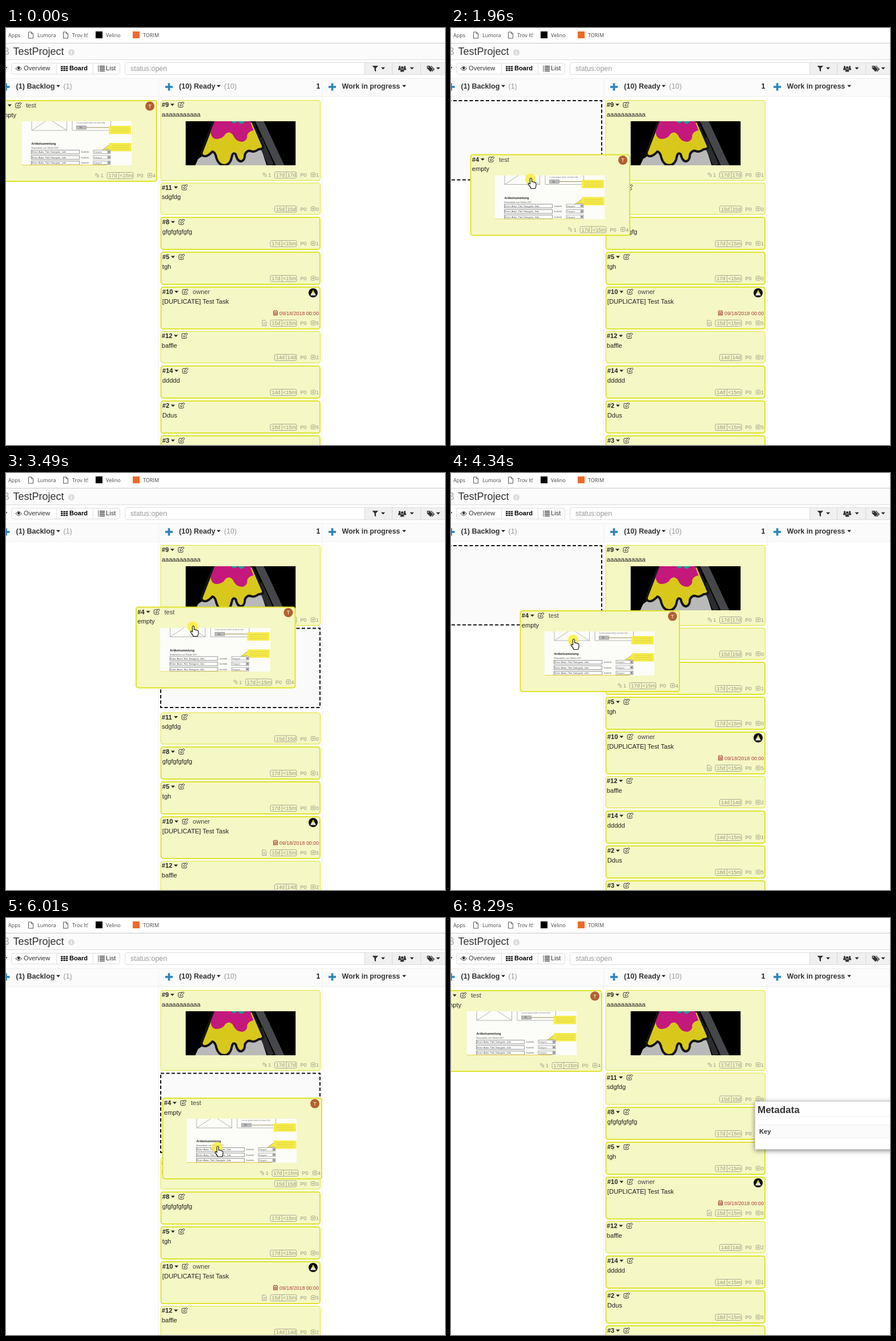
An HTML page for the animation above (8.63 s loop, 769x729 px).

```html
<!DOCTYPE html>
<html lang="en">
<head>
<meta charset="utf-8">
<title>Board drag and drop</title>
<style>
html, body { margin: 0; width: 100%; height: 100%; overflow: hidden; background: #fff; }
svg { display: block; width: 100%; height: 100%; font-family: "Liberation Sans", Arial, sans-serif; }
text { white-space: pre; }
</style>
</head>
<body>
<svg id="stage" viewBox="0 0 769 729" xmlns="http://www.w3.org/2000/svg"></svg>
<script>
const LOOP = 8630;
const CARD_W = 281, READY_X = 270, HOME = [-16, 126], SLOT_SHIFT = 148;
const DRAG_START = 1080, DROP = 7000, POPUP = 7770;

// Drawing helpers
const text = (x, y, s, size = 11.1, fill = '#222', extra = '') =>
  `<text x="${x}" y="${y}" font-size="${size}" fill="${fill}" ${extra}>${s}</text>`;
const bold = (x, y, s, size = 11.1, fill = '#222') => text(x, y, s, size, fill, 'font-weight="bold"');
const rect = (x, y, w, h, fill, extra = '') =>
  `<rect x="${x}" y="${y}" width="${w}" height="${h}" fill="${fill}" ${extra}/>`;
const path = (d, fill = 'none', stroke = 'none', width = 1) =>
  `<path d="${d}" fill="${fill}" stroke="${stroke}" stroke-width="${width}" stroke-linejoin="round"/>`;
const circle = (x, y, r, fill, extra = '') => `<circle cx="${x}" cy="${y}" r="${r}" fill="${fill}" ${extra}/>`;
const group = (x, y, body, extra = '') => `<g transform="translate(${x} ${y})" ${extra}>${body}</g>`;
const caret = (x, y, fill = '#222') => path(`M${x - 3.5} ${y - 1.8}h7l-3.5 3.8z`, fill);
const plus = x => path(`M${x - 6.5} 103h13M${x} 96.5v13`, 'none', '#2a84bd', 3.6);

const editIcon = (x, y) => group(x, y,
  path('M2.5 -4H-3.5Q-4.8 -4 -4.8 -2.7V3Q-4.8 4.3 -3.5 4.3H2Q3.3 4.3 3.3 3V1', 'none', '#333') +
  path('M-1.8 1.8L-1.4 -.6L3.4 -5.2L5.3 -3.4L.6 1.4Z', '#f5f7c4', '#333'));

const clipIcon = (x, y) => path(`M${x + 2} ${y - 1.5}l3.5 3.5q1 1.4 0 2q-.8 .5 -1.8 -.5l-3 -3.200q-1.200 -1.500 -.2 -2.600q1.100 -1 2.600 .3l3.600 3.600`, 'none', '#959580', .8);
const docIcon = (x, y) => path(`M${x} ${y - 4.5}h4.5l2.5 2.5v7h-7zM${x + 1.8} ${y}h3.5M${x + 1.8} ${y + 2.3}h3.5`, 'none', '#999', .9);

function footer(y, ages, count, hasFile, hasDoc) {
  const gray = '#959580', split = ages[1].length > 3 ? 213 : 220.5, left = split - 20.5;
  let out = rect(left + .5, y - 8.5, 238.5 - left, 11, 'none', `rx="2.5" stroke="#aaa996"`) +
    path(`M${split + .5} ${y - 8.5}v11`, 'none', '#aaa996') +
    text(left + 3, y, ages[0], 9, gray) + text(split + 2.2, y, ages[1].replace('<', '&lt;'), 9, gray) +
    text(245.5, y, 'P0', 9, gray) +
    rect(264.5, y - 7, 7, 7, 'none', `rx="1" stroke="${gray}" stroke-width=".8"`) +
    path(`M266 ${y - 3.5}h4M268 ${y - 5.5}v4`, 'none', gray, .8) +
    text(273, y, count, 9, gray);
  if (hasFile) out += clipIcon(left - 20, y - 4) + text(left - 10.8, y, '1', 9, gray);
  if (hasDoc) out += docIcon(left - 13.5, y - 3.5);
  return out;
}

function card({ id, title, height, thick, ages, count, who = '', file, doc, body = '' }) {
  const line = thick ? 2 : 1, inset = thick ? 1 : 0, mark = 9 + inset + id.length * 6.2;
  return rect(line / 2 + .5, line / 2, CARD_W - line - .5, height - line, '#f5f7c4',
      `rx="4" stroke="#dfe32d" stroke-width="${line}"`) +
    bold(2.8 + inset, 12.3 + inset, id) + caret(mark, 8.3 + inset) +
    editIcon(mark + 15.3, 8.3 + inset) + text(mark + 28.5, 12.3 + inset, who, 11.1, '#444') +
    text(2.8 + inset, 28.6 + inset, title) + body +
    footer(height - 7 - inset, ages, count, file, doc);
}

// Thumbnails, both 193 by 77
const sculpture = rect(0, 0, 193, 77, '#000') +
  path('M122 0L158 77H173L137 0Z', '#46474b') + path('M118 0L22 66L17 77H142L132 46Z', '#b9b9b9') +
  path('M129 30L150 77', 'none', '#2b2c2f', 10) +
  path('M47 6L28 55Q28 62 36 61Q42 59 47 53Q52 54 54 64Q58 77 68 77Q79 76 81 62Q83 53 88 58Q91 71 98 70Q104 68 104 58Q108 50 114 52Q120 55 128 49Q136 49 136 44L117 0H50Z', '#d8c81c', '#151515', 4) +
  path('M51 0L44 18Q45 32 56 31Q66 30 70 22Q77 16 83 24Q88 36 99 36Q109 34 108 24Q111 17 119 16L113 0Z', '#c4187c') +
  path('M80 0q5 7 11 0zM92 0q6 9 12 0z', '#1d9c94');

const note = (x, y) => rect(x, y, 39, 14.5, '#f5ec4a') +
  [4, 7.5, 11].map(dy => path(`M${x + 4} ${y + dy}h31`, 'none', '#d8cb40', .8)).join('');
const formRow = y =>
  rect(17, y - 3.5, 84, 6.5, '#fff', 'stroke="#777" stroke-width=".8"') +
  text(18, y + 1, 'Enter: Autor, Titel, Kategorie, Jahr', 4, '#333') +
  text(104, y + 1, 'Suchfeld', 3.4, '#555') +
  rect(125.5, y - 3.5, 30, 6, '#fff', 'stroke="#888" stroke-width=".7"') +
  text(127, y + 1, 'Kategorie', 3.2, '#555') + rect(150, y - 3, 5.5, 5, '#bbb') + rect(151.8, y - 1.2, 2, 1.5, '#555');
const mockup = rect(0, 0, 193, 77, '#fcfcf8') +
  path('M17.5 0V16H79V0M17.5 16L42 0M79 16L54 0', 'none', '#aaa', .9) +
  path('M88.5 0V16H156V0', 'none', '#aaa', .9) +
  text(96, 4, 'Lorem ipsum dolor sit amet elitr', 3.6, '#777') +
  rect(96, 8, 17, 6, '#bbb', 'stroke="#888" stroke-width=".6"') + text(101, 12.4, 'Go', 3.6, '#333') +
  path('M113 11L152 11L160 16', 'none', '#8a8440', .9) + path('M139 52L154 41L162 46Z', '#f5ec4a', '#8a8440', .7) +
  note(152.5, 8) + note(153, 38) +
  bold(17, 41, 'Artikelsammlung', 5.3) + text(17, 48, 'Bestandsliste vom Oktober 2017', 3.3, '#555') +
  [54, 63.5, 73].map(formRow).join('') + path('M0 76.5H150', 'none', '#e6cf45', 1.2);

const thumb = (id, x, y, art) => `<clipPath id="${id}"><rect width="193" height="77"/></clipPath>` +
  group(x, y, `<g clip-path="url(#${id})">${art}</g>`);

const dueDate = rect(198.5, 43, 7, 7, 'none', 'stroke="#a8403c"') +
  path('M198.5 45.5h7M198.5 47.8h7M200.8 45v5M203.2 45v5M200.5 41v2M203.5 41v2', 'none', '#a8403c', .8) +
  text(209, 50, '09/18/2018 00:00', 8.9, '#a8403c');
const smallPhoto = circle(268, 11, 8, '#0a0a0a') + path('M268 6L263 15.5H273Z', '#e6e6de') + path('M268 6L265.5 11H270.5Z', '#d8c81c');
const letterBadge = circle(268, 10.5, 8, '#b4602f') + text(268, 13.7, 'T', 9, '#fff', 'text-anchor="middle"');

const readyCards = [
  { id: '#9', title: 'aaaaaaaaaaa', top: 126, height: 141, ages: ['17d', '17d'], count: 1, file: true,
    body: thumb('photo', 44.5, 37, sculpture) },
  { id: '#11', title: 'sdgfdg', top: 270.5, height: 56, ages: ['15d', '15d'], count: 0 },
  { id: '#8', title: 'gfgfgfgfgfg', top: 330, height: 58, thick: true, ages: ['17d', '<15m'], count: 1 },
  { id: '#5', title: 'tgh', top: 391, height: 58, thick: true, ages: ['17d', '<15m'], count: 0 },
  { id: '#10', title: '[DUPLICATE] Test Task', top: 452, height: 75, thick: true, ages: ['15d', '<15m'], count: 5,
    who: 'owner', doc: true, body: dueDate + smallPhoto },
  { id: '#12', title: 'baffle', top: 530, height: 56, ages: ['14d', '14d'], count: 2 },
  { id: '#14', title: 'ddddd', top: 590, height: 58, thick: true, ages: ['14d', '<15m'], count: 1 },
  { id: '#2', title: 'Ddus', top: 651, height: 58, thick: true, ages: ['18d', '<15m'], count: 5 },
  { id: '#3', title: 'tests', top: 712, height: 58, thick: true, ages: ['18d', '<15m'], count: 0 }
];
const movingCard = { id: '#4', title: 'empty', height: 143, thick: true, ages: ['17d', '<15m'], count: 4,
  who: 'test', file: true, body: thumb('sheet', 43.5, 37, mockup) + letterBadge };

// Page chrome
const bookmark = (x, s) => text(x, 15.6, s, 9, '#444', `font-family="'Open Sans', sans-serif"`);
const pageIcon = x => path(`M${x} 7h5l3 3v8h-8zM${x + 5} 7v3h3`, '#fff', '#555');
const person = (x, y, s) => circle(x, y - 2.5 * s, 2 * s, '#333') + path(`M${x - 3 * s} ${y + 4 * s}q0 -4.5 ${3 * s} -4.5t${3 * s} 4.5z`, '#333');
const grid = [0, 1, 2].flatMap(i => [0, 1, 2].map(j => rect(96 + i * 4.4, 66.5 + j * 3.2, 3.5, 2.3, '#222'))).join('');
const listIcon = [0, 1, 2, 3].map(i => rect(161, 66 + i * 2.8, 1.6, 1.4, '#333') + rect(164, 66 + i * 2.8, 9, 1.4, '#333')).join('');

const chrome = bookmark(4, 'Apps') + pageIcon(39.5) + bookmark(55, 'Lumora') + pageIcon(100.5) + bookmark(116, 'Trov It!') +
  rect(157, 6, 12, 12, '#000') + bookmark(175, 'Velino') + rect(222, 6, 12, 12, '#f06a2a') + bookmark(240, 'TORIM') +
  rect(0, 26, 769, 1, '#c8c8c8') + rect(0, 27, 769, 28, '#fbfbfb') + rect(0, 55, 769, 1, '#dcdcdc') +
  text(-6, 47.3, 'B', 18, '#aaa') + text(12.5, 47.3, 'TestProject', 18, '#333') +
  circle(114.5, 42.5, 5.6, '#dcdcdc') + bold(113.2, 46, 'i', 9, '#fff') +
  caret(-1, 70) + rect(9.5, 61.5, 190, 19, '#fff', 'rx="3" stroke="#ddd"') +
  path('M88.5 61.5v19M152.5 61.5v19', 'none', '#ddd') +
  path('M17 71q5 -7 10.5 0q-5.5 6.5 -10.5 0z', 'none', '#333') + circle(22.2, 70.3, 2.2, '#333') +
  text(31, 74.3, 'Overview', 11.1, '#333') + grid + bold(111, 74.3, 'Board', 11.1, '#000') +
  listIcon + text(175, 74.3, 'List', 11.1, '#333') +
  rect(208.5, 60.5, 565, 21, '#fff', 'rx="3" stroke="#ddd"') + text(218, 75, 'status:open', 12.4, '#999') +
  rect(628, 61, 141, 20, '#f0f0f0') + path('M628.5 61v20M676.5 61v20M726.5 61v20', 'none', '#d8d8d8') +
  path('M641.5 66h10.5l-4 4.5v6l-2.5 -2v-4z', '#333') + caret(660.5, 70.5) +
  person(689.5, 70, .85) + person(698.5, 70, .85) + person(694, 72, 1.1) + caret(711, 70.5) +
  path('M737.5 66h4.5l6 6l-4.5 4.5l-6 -6zM743.5 66h1.5l6 6l-4.5 4.5l-1 -1l3.5 -3.5z', '#333') +
  circle(739.6, 68.2, 1, '#f0f0f0') + caret(757, 70.5) +
  rect(0, 88, 769, 31, '#fbfbfb') + rect(0, 88, 769, 1, '#eee') + rect(0, 119, 769, 1, '#eee') +
  path('M267.5 88V729M553.5 88V729', 'none', '#efefef') +
  plus(0) + bold(17.5, 106, '(1) Backlog', 12.6, '#333') + caret(91.5, 101.5) + text(100.5, 106, '(1)', 12.4, '#999') +
  plus(285.5) + bold(303, 106, '(10) Ready', 12.6, '#333') + caret(372.5, 101.5) + text(382, 106, '(10)', 12.4, '#999') +
  bold(543.5, 106, '1', 12.4) + plus(571.5) + bold(588.5, 106, 'Work in progress', 12.4, '#333') + caret(697.5, 101.5);

const popup = rect(532.5, 320.5, 260, 84, '#fff', 'stroke="#ccc" style="filter:drop-shadow(0 2px 4px rgba(0,0,0,.45))"') +
  bold(537, 341, 'Metadata', 17, '#333') + rect(537, 346, 232, 1, '#eee') +
  rect(537, 361, 232, 24, '#fbfbfb') + rect(537, 361, 232, 1, '#eee') + rect(537, 384, 232, 1, '#eee') +
  bold(540, 377, 'Key', 11.1, '#333');

const hand = path('M-2.5 2V-7Q-2.5 -9 -1 -9Q.5 -9 .5 -7V-2Q2 -3.2 3 -1.5Q5 -2.4 5.8 -.6Q8 -1 8 1.5V4Q8 6 6.5 9.5H-1Q-2 6 -5.5 2.5Q-6.5 .5 -4.5 .3Q-3.5 .8 -2.5 2Z', '#fff', '#111', 1.1);
const arrow = path('M-2 -8V6L1.2 3L3.5 8L5.5 7L3.3 2.2H7.5Z', '#fff', '#111');

const dashed = 'stroke="#111" stroke-width="2" stroke-dasharray="6 3.5"';
const stage = document.getElementById('stage');
stage.innerHTML = chrome +
  readyCards.map((c, i) => group(READY_X, c.top, card(c), `id="ready${i}"`)).join('') +
  `<g id="slot">${rect(1, 1, CARD_W - 2, 138.5, '#fafafa', dashed)}</g>` +
  `<g id="moving">${card(movingCard)}</g><g id="popup">${popup}</g>` +
  `<g id="cursor">${circle(-2, -7, 9.5, '#fbee25', 'opacity=".75"')}<g id="hand">${hand}</g><g id="arrow">${arrow}</g></g>`;

// Bursts of picture updates: first, last, number of updates
const bursts = [
  [100, 660, 6], [1080, 1840, 8], [1960, 2490, 6], [2720, 2820, 2], [2960, 3040, 2],
  [3370, 3490, 2], [3600, 3710, 2], [4010, 4340, 4], [4550, 5090, 6], [5200, 5320, 2],
  [5430, 6010, 6], [6090, 6210, 2], [6310, 6880, 6], [7000, 7000, 1], [7210, 7520, 4], [7770, 8290, 6]
];
const ticks = bursts.flatMap(([from, to, n]) =>
  Array.from({ length: n }, (_, i) => from + (n > 1 ? (to - from) * i / (n - 1) : 0)));

// time, card x, card y, pointer x, pointer y
const keys = [
  [100, -16, 126, 618, 665], [660, -16, 126, 81, 185], [1080, -14, 130, 84, 191],
  [1840, 5, 183, 107, 240], [1960, 33, 220.5, 141, 271], [2490, 190, 240, 286, 299],
  [2820, 64, 236, 160, 295], [3040, 131, 240, 230, 298], [3370, 190, 238, 295, 288],
  [3490, 226.5, 233.5, 329, 276], [3710, 274, 222, 370, 281], [4010, 215, 226, 305, 286],
  [4340, 120, 240, 216, 299], [4550, 150, 258, 250, 325], [5090, 276, 450, 372, 508],
  [5320, 277, 414, 373, 468], [5430, 276, 395, 372, 442], [5780, 274, 234, 370, 293],
  [6010, 273, 314, 372, 408], [6090, 273, 350, 370, 409], [6210, 272, 345, 368, 403],
  [6880, 44, 170, 131, 199], [7000, -16, 126, 135, 207], [7210, -16, 126, 165, 217],
  [7520, -16, 126, 727, 398], [7770, -16, 126, 723, 440], [8290, -16, 126, 700, 760]
];

function poseAt(t) {
  const next = keys.findIndex(k => k[0] >= t);
  if (next <= 0) return keys[0].slice(1);
  const a = keys[next - 1], b = keys[next], u = (t - a[0]) / (b[0] - a[0]);
  return a.slice(1).map((v, i) => v + (b[i + 1] - v) * u);
}

const el = id => document.getElementById(id);
const place = (node, x, y) => node.setAttribute('transform', `translate(${x} ${y})`);
const show = (node, on) => node.setAttribute('visibility', on ? 'visible' : 'hidden');
const parts = Object.fromEntries(['slot', 'moving', 'popup', 'cursor', 'hand', 'arrow'].map(id => [id, el(id)]));
const readyNodes = readyCards.map((_, i) => el('ready' + i));

function render(time) {
  const tick = ticks.filter(t => t <= time).pop() ?? 0;
  const [x, y, px, py] = poseAt(tick);
  const dragging = tick >= DRAG_START && tick < DROP;
  const inReady = dragging && x > 172;
  const index = !inReady ? Infinity : y < 370 ? 1 : y < 420 ? 2 : 3;

  readyNodes.forEach((node, i) => place(node, READY_X, readyCards[i].top + (i >= index ? SLOT_SHIFT : 0)));
  show(parts.slot, dragging);
  if (inReady) place(parts.slot, READY_X, readyCards[index].top);
  else place(parts.slot, ...HOME);
  place(parts.moving, x, y);
  show(parts.popup, tick >= POPUP);

  const pointerOn = tick >= 100, overCards = px < 551;
  place(parts.cursor, Math.round(px), Math.round(py));
  show(parts.cursor, pointerOn);
  show(parts.hand, pointerOn && overCards);
  show(parts.arrow, pointerOn && !overCards);
}

const start = performance.now();
function loop() {
  render((performance.now() - start) % LOOP);
  requestAnimationFrame(loop);
}
loop();
</script>
</body>
</html>
```
